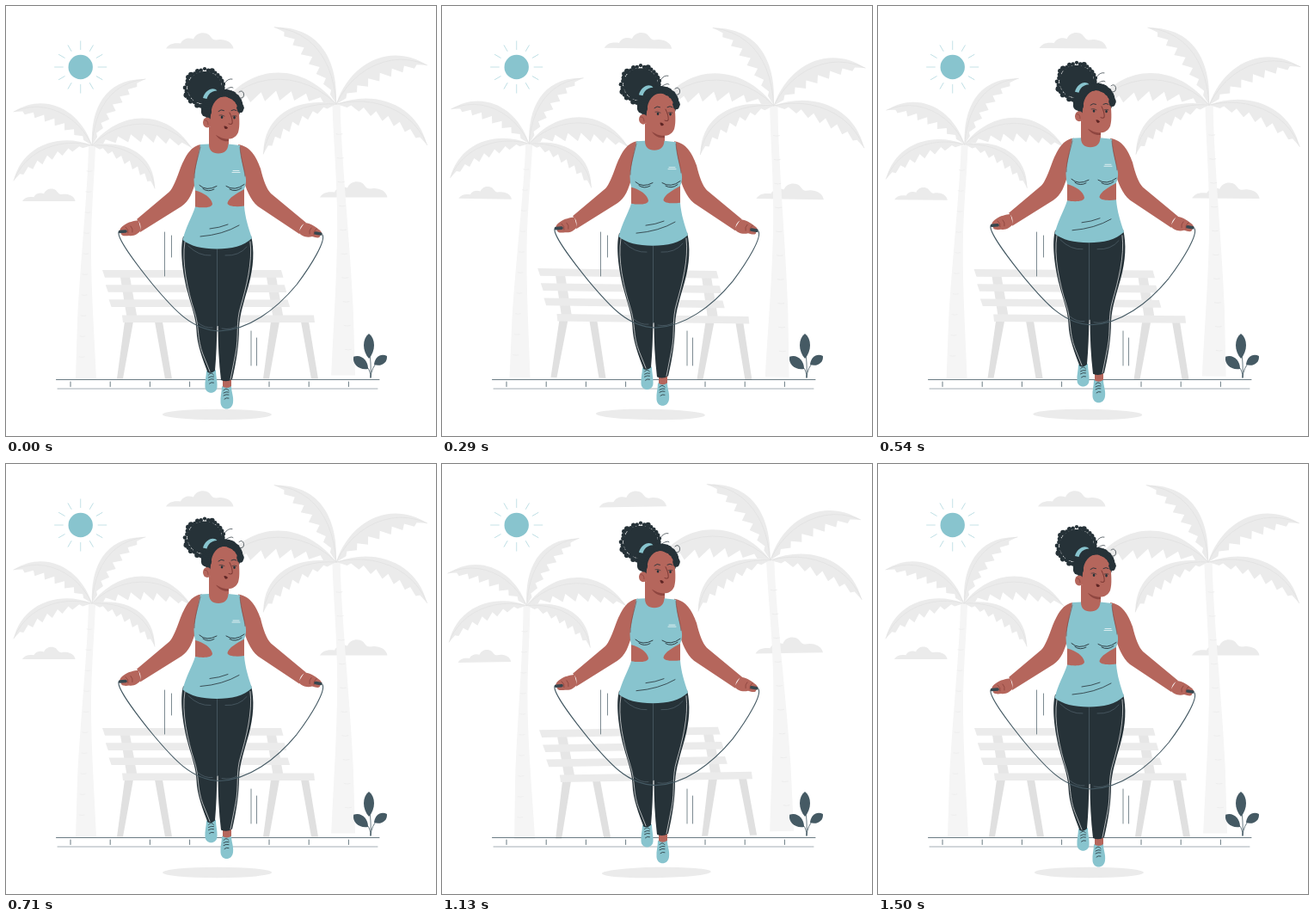
These frames come from a looping animation (500x500 px, 1.54 s). An HTML page:

```html
<!DOCTYPE html>
<html lang="en">
<head>
<meta charset="utf-8">
<title>Rope skipping</title>
<style>
  html, body { margin: 0; width: 100%; height: 100%; overflow: hidden; background: #fff; }
  svg { display: block; width: 100vw; height: 100vh; }
  .ln { fill: none; stroke-linecap: round; stroke-linejoin: round; }
</style>
</head>
<body>
<svg viewBox="0 0 500 500">
  <defs>
    <path id="cloud" d="M0 0C3-5 8-7 17-6C20-12 27-13 32-11C35-19 45-20 50-16C53-13 54-10 58-10C66-12 77-9 78.500 0Z"/>
    <g id="palm"></g>
    <g id="laces" class="ln" stroke="#263238" stroke-width=".8">
      <path d="M-3-6Q0-10 3-6M-3-3Q0-5 3-4M-3 0Q0-2 3-1M-2 4Q0 2 3 3"/>
    </g>
  </defs>

  <g id="scene">
    <g fill="#ebebeb">
      <use href="#cloud" x="186" y="49.500"/>
      <use href="#cloud" x="365" y="222.500"/>
      <use href="#cloud" transform="translate(19 227) scale(.785)"/>
    </g>
    <use href="#palm" transform="translate(100 162)"/>
    <use href="#palm" transform="translate(384 114) scale(-1.160 1.160)"/>
    <g id="bench"></g>
    <ellipse cx="245.500" cy="475" rx="63.500" ry="6.200" fill="#ebebeb"/>
  </g>

  <g id="sun" transform="translate(86.700 71)" stroke="#88c4ce" stroke-width=".7">
    <circle r="14.200" fill="#88c4ce" stroke="none"/>
  </g>

  <g class="ln" stroke="#455a64" stroke-width=".8">
    <path d="M58.500 434.500H434"/>
    <path d="M60 445H432" stroke="#8d9ba3"/>
    <path id="ticks"/>
    <path d="M184.500 263V314M192.500 267V292M285 378V418M291.500 386V418" stroke-width=".7"/>
    <path d="M422 396Q425 416 424 432M420 420Q424 424 424 432M432 414Q425 420 424 432"/>
  </g>
  <g id="plant" fill="#455a64"></g>

  <g id="girl">
    <!-- arms and trunk -->
    <g fill="#b5665c">
      <path d="M228 161C215 162 209 174 203 188C198 202 194 212 190 216L152 248C157 252 157 257 156 263L204 233C213 227 217 217 221 202Z"/>
      <path d="M270 161C284 163 291 175 296 189C299 202 303 213 308 218L349 252C343 254 341 259 341 265L293 233C284 226 279 212 275 199Z"/>
      <path d="M154 249C149 250 142 251 137 255C132 258 131 262 134 264C133 267 138 268 143 267C149 268 153 265 157 261Z"/>
      <path d="M347 252C353 252 359 256 364 260C368 263 368 266 365 267C366 270 361 270 356 268C349 270 343 267 340 263Z"/>
      <path d="M220 205H277V236H220Z"/>
      <path d="M236 140L259 148V164C259 171 253 174 247 174C240 174 236 170 236 164Z"/>
    </g>
    <path d="M244 150C248 156 254 158 259 157V152Z" fill="#8f4640"/>
    <path class="ln" stroke="#8a423c" stroke-width=".8" d="M139 257Q143 260 142 264M145 256Q148 259 147 263M361 259Q357 262 358 266M355 258Q352 261 353 265"/>

    <!-- shoes -->
    <path d="M234 420H243V430H234ZM252 432H262V446H252Z" fill="#b5665c"/>
    <g fill="#88c4ce">
      <path d="M233 424Q239 427 244 423C244 431 246 436 245.500 443C245 452 232 452 231.500 443C231 436 233 431 233 424Z"/>
      <path d="M251 442Q257 446 262 442C262 449 265 454 264 461C263 471 250 471 249.500 461C249 454 251 449 251 442Z"/>
    </g>
    <use href="#laces" x="238.500" y="435"/>
    <use href="#laces" x="256" y="453"/>

    <!-- leggings -->
    <path d="M206 268C202 283 205 309 211 332C215 348 221 362 221.500 377C222 394 229 411 234.500 426Q239 428 243 424C244.500 407 245 390 245.500 372H246.500C246.500 392 247.500 414 250 435Q257 438 263 434C268 413 271 393 271 374C272 357 277 343 282 325C288 303 289 284 285 267Z" fill="#263238"/>
    <g class="ln" stroke-width=".7">
      <path d="M208 274C204 298 211 330 219 355C225 373 222 388 229 405L237 425M284 274C287 298 279 328 273 349C267 368 271 384 267 404L261 434" stroke="#fff" opacity=".9"/>
      <path d="M245.500 283V372M212 279Q224 291 238 290M280 280Q271 291 255 290M223 368Q231 375 240 374M269 372Q262 377 251 375" stroke="#52646d"/>
    </g>

    <!-- top -->
    <path d="M226 161L236 160.500C236 168 240 171.500 247 171.500C254 171.500 258 168 258.500 160.500L272 162C273 177 276 187 278 196C280 203 279 208 277 213C268 218 259 223 257.500 229C257 233 268 234 277 232.500C278 246 282 258 286 270C277 279 262 282.500 245 282.500C228 282.500 214 279 205.500 272C209 257 216 246 220 233.500C228 235 240 235 240 230C239 223 230 217 220 214.500C218 206 218 198 220 190C222 180 224 170 226 161Z" fill="#88c4ce"/>
    <g class="ln" stroke="#263238" stroke-width=".9">
      <path d="M225 208.500Q233 216 245 209.500M229 212.500Q235 217 242 213M256 209.500Q266 216 277 207.500M260 213Q267 217 274 211.500"/>
      <path d="M237 259Q248 258 258 254M226 268Q252 266 271 255" stroke-width=".8"/>
      <path d="M226 164C223 177 219 188 219 200M272 164C273 178 277 188 278 198" stroke="#7b3b36" stroke-width=".6"/>
      <path d="M264 191.500H271M263 193.500H272" stroke="#fff" stroke-width=".7"/>
    </g>

    <!-- head -->
    <g id="bun" fill="#263238"></g>
    <g fill="#b5665c">
      <ellipse cx="234" cy="135.500" rx="5" ry="6"/>
      <path d="M238 127C239 112 246 105 256 105C264 105 269 110 270.500 118C271 128 272.500 139 270 147C267 154 260 156 253 154C246 152 240 148 237 140Z"/>
    </g>
    <g id="curls" fill="#263238"></g>
    <path d="M229 107C231 98 241 93 245.500 98.500C238 99 235 103 233.500 108Z" fill="#88c4ce"/>
    <g class="ln" stroke="#263238" stroke-width=".9">
      <path d="M247 122.500Q250 119.500 253.500 121.500M262 121.500Q265 119.500 268 121.500"/>
      <path d="M248 127Q251 126 254 128M263 128Q266 127 268 128" stroke-width=".6"/>
      <path d="M260 124Q264 132 263 137Q261 138 259 137" stroke="#6a2d2a" stroke-width=".8"/>
      <path d="M231 133Q235 132 235 138" stroke="#8f4640" stroke-width=".8"/>
      <path d="M272 107Q277 108 276.500 102Q275 97 271 100M254 90Q258 84 263 85M210 107Q205 106 208 102M256 97Q262 93 264 95" stroke-width=".7"/>
    </g>
    <path d="M251 127.600a1.300 1.700 0 1 0 .1 0M265.500 128.100a1.300 1.700 0 1 0 .1 0" fill="#263238"/>
    <path d="M253.500 139.500Q256 139 258 141.500Q257 143.500 255 143Q253.500 142 253.500 139.500Z" fill="#5e2524"/>

    <!-- rope -->
    <g class="ln" stroke="#455a64">
      <path d="M131 263C129 271 157 307 170 323C195 353 216 377 248 378C282 377 314 353 338 324C356 300 372 273 368 266" stroke-width="1.100"/>
      <path d="M132.500 262.500L139 262M360 264L366 265" stroke="#37474f" stroke-width="3.600"/>
    </g>
  </g>
</svg>
<script>
const $ = id => document.getElementById(id);
const add = (id, html) => $(id).insertAdjacentHTML('beforeend', html);
const times = (n, fn) => Array.from({ length: n }, (_, i) => fn(i));
const shape = (fill, d) => `<path fill="${fill}" d="${d}"/>`;
const TAU = 2 * Math.PI;

let seed = 7;
const rand = () => (seed = seed * 16807 % 2147483647) / 2147483647;

// A frond arches from the crown (0,0) to its tip; leaflets hang towards the chord.
function frond(x1, y1, x2, y2, x, y) {
  const at = (t, sag) => {
    const a = 3 * t * (1 - t) ** 2, b = 3 * t * t * (1 - t), c = t ** 3;
    const mix = (p, q, end) =>
      a * (p + (end / 3 - p) * sag) + b * (q + (end * 2 / 3 - q) * sag) + c * end;
    return `${mix(x1, x2, x).toFixed(1)} ${mix(y1, y2, y).toFixed(1)}`;
  };
  const n = 7;
  const edge = times(n, i => {
    const t = 1 - (i + 1) / (n + 1);
    return `L${at(t + .02, .55)}L${at(t - .01, .85)}`;
  }).join('');
  const spine = `M0 0C${x1} ${y1} ${x2} ${y2} ${x} ${y}`;
  add('palm', shape('#ebebeb', `${spine}${edge}Z`) +
    `<path class="ln" stroke="#e0e0e0" stroke-width=".6" d="M0 0${times(12, i => 'L' + at((i + 1) / 12, .2)).join('')}"/>`);
}

add('palm', shape('#f5f5f5', 'M-4 0C-5 55-14 140-17 205L-19 272H5C3 225-1 170-1 120C-1 75 3 35 4 0Z'));
add('palm', times(10, i => `<path class="ln" stroke="#ebebeb" stroke-width=".7" d="M${-6 - i} ${30 + i * 24}q3 1 6 0"/>`).join(''));
frond(-2, -42, 15, -78, 62, -77);
frond(-14, -42, -55, -62, -91, -39);
frond(-38, -15, -81, 0, -91, 41);
frond(30, -40, 85, -45, 116, 3);
frond(35, -7, 73, 8, 73, 50);

for (const x of [0, 170]) {
  add('bench', shape('#e6e6e6', `M${132.5 + x} 312h11l9 50h-12Z`) +
    shape('#e0e0e0', `M${138 + x} 367h10l-12 66.500h-7ZM${173 + x} 367h9l11 66.500h-8Z`));
}
times(3, i => add('bench', shape('#ebebeb', `M${112 + 3.8 * i} ${307 + 17.2 * i}h208l2.500 8.700h-207.500Z`)));
add('bench', shape('#ebebeb', 'M135 359.500H358L359 368H136Z'));

times(12, i => add('sun', `<path opacity=".7" transform="rotate(${i * 30})" d="M${i % 3 ? 21 : 20} 0h${i % 3 ? 8.5 : 10.5}"/>`));

$('ticks').setAttribute('d', times(8, i => i === 4 ? '' : `M${75 + i * 46.2} 437v5.500`).join(''));

const leaf = (x, y, len, w, turn) => add('plant',
  `<path transform="translate(${x} ${y}) rotate(${turn})" d="M0 0C${-w} ${-len * .3} ${-w} ${-len * .8} 0 ${-len}C${w} ${-len * .8} ${w} ${-len * .3} 0 0Z"/>`);
leaf(422, 410, 29, 8, 0);
leaf(421, 422, 22, 8, -50);
leaf(428, 417, 18, 7, 56);

const curl = (id, x, y, r) => add(id, `<circle cx="${x.toFixed(1)}" cy="${y.toFixed(1)}" r="${r.toFixed(1)}"/>`);

// Bun and the hair at the back of the head
add('bun', '<ellipse cx="231" cy="95" rx="20" ry="19"/><ellipse cx="251" cy="118" rx="22" ry="21"/>');
times(32, i => {
  const a = i / 32 * TAU, k = .93 + .13 * rand();
  curl('bun', 231 + 22 * k * Math.cos(a), 95 + 21 * k * Math.sin(a), 2 + 1.2 * rand());
});
// Curls framing the face, from the ear over the forehead to the right temple
times(26, i => {
  const a = Math.PI * (.93 + i / 25 * 1.1), wide = 1 - i / 25;
  curl('curls', 252.5 + 20 * Math.cos(a), 119 + 18 * Math.sin(a), 3.2 + 2 * wide + rand());
});

const LOOP = 1540, CYCLE = 1500, LEAD = 22;
// Triangle wave: 0 at the cycle start, 1 halfway, 0 again at the end
const tri = p => 1 - Math.abs(1 - 2 * (p - Math.floor(p)));

function draw(ms) {
  const p = (Math.min(ms % LOOP, CYCLE) + LEAD) / CYCLE;
  const lift = 10 * tri(p) - .3;
  const sway = 2 * tri(p + .25) - 1.05;
  $('girl').setAttribute('transform', `translate(0 ${-lift})`);
  $('scene').setAttribute('transform', `rotate(${sway} 250 250)`);
}

const start = performance.now();
function tick() {
  draw(performance.now() - start);
  requestAnimationFrame(tick);
}
tick();
</script>
</body>
</html>
```
